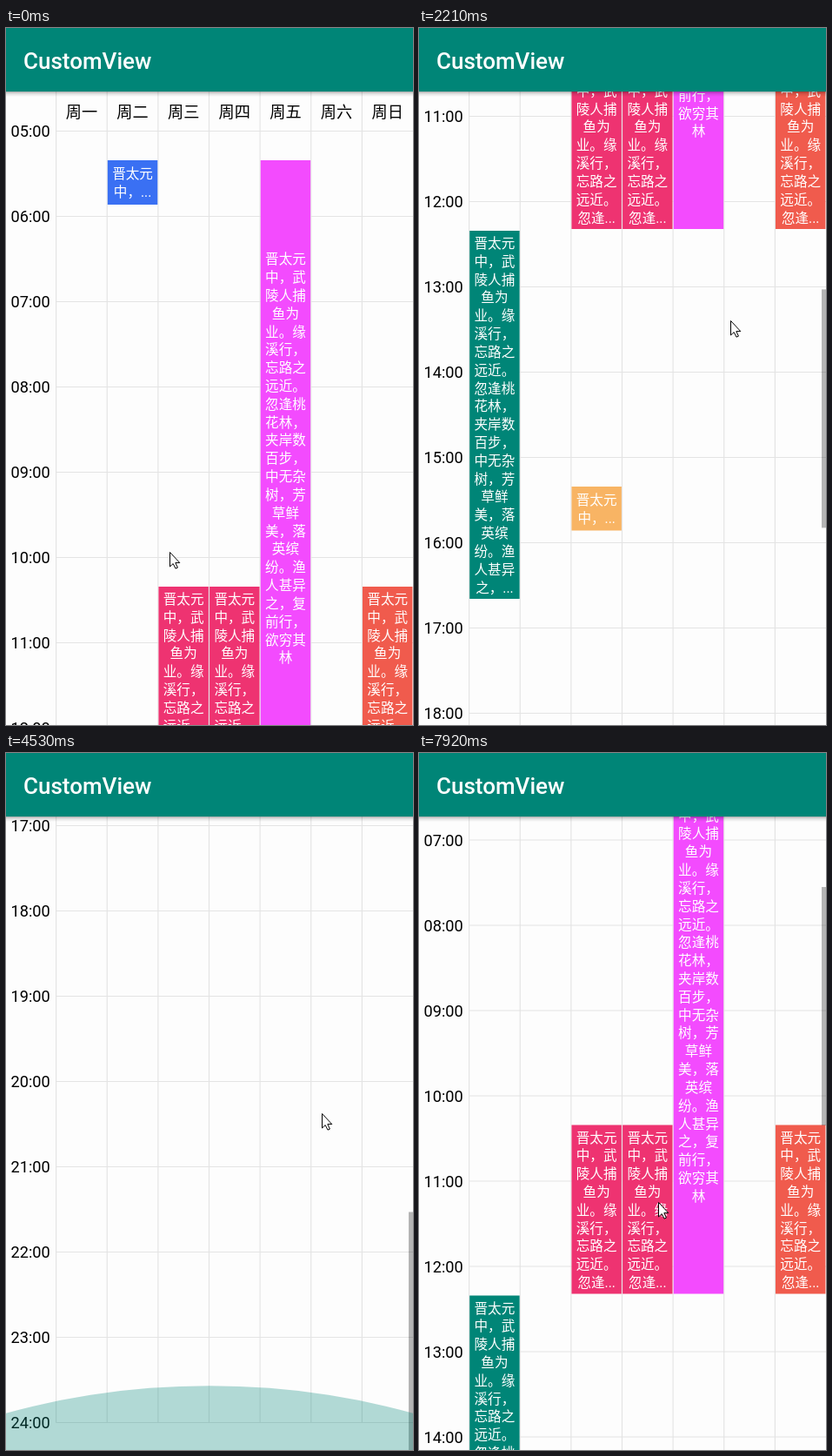
An HTML page with a canvas that plays this animation: 468 px wide and 801 px high, repeating every 8000 ms.

```html
<!DOCTYPE html>
<html lang="zh-CN">
<head>
<meta charset="utf-8">
<title>CustomView</title>
<style>
  html, body { margin: 0; width: 100%; height: 100%; overflow: hidden; background: #fdfdfd; }
  canvas { display: block; }
</style>
</head>
<body>
<canvas id="stage" width="468" height="801"></canvas>
<script>
const ctx = document.getElementById('stage').getContext('2d');
const W = 468, H = 801, LOOP = 8000;
const BAR = 73, LEFT = 57.6, COL = (W - LEFT) / 7;
const TOP = 118.5, HOUR = 98, MAX_SCROLL = 1211;
const TEAL = '#008577';
const CJK = 'Roboto, "Noto Sans CJK SC", "Noto Sans CJK", sans-serif';

const DAYS = [...'一二三四五六日'].map(d => '周' + d);
const STORY = ('晋太元 中，武 陵人捕 鱼为 业。缘 溪行， 忘路之 远近。 忽逢桃 花林， 夹岸数 百步， ' +
  '中无杂 树，芳 草鲜 美，落 英缤 纷。渔 人甚异 之，复 前行， 欲穷其 林').split(' ');

// day, top, bottom, visible lines, colour
const EVENTS = [
  [1, 152, 203, 2, '#3a70f3'],
  [4, 152, 836, 23, '#f34bfe'],
  [2, 642, 836, 9, '#ee3371'],
  [3, 642, 836, 9, '#ee3371'],
  [6, 642, 836, 9, '#f05b4d'],
  [0, 838, 1261, 20, TEAL],
  [2, 1132, 1182.5, 2, '#f8b464']
];

// time, pointer x, pointer y, scroll, edge glow
const KEYS = [
  [0, 188, 602, 0, 0],
  [400, 188, 602, 0, 0],
  [900, 205, 390, 170, 0],
  [1100, 225, 370, 212, 0],
  [1520, 266, 660, 228, 0],
  [1670, 270, 687, 229, 0],
  [2210, 358, 336, 605, 0],
  [2630, 350, 400, 750, 0],
  [3100, 325, 590, 818, 0],
  [3470, 313, 656, 828, 0],
  [3640, 313, 656, 828, 0],
  [4080, 340, 400, 1060, 0],
  [4380, 355, 385, 1211, 0.5],
  [4530, 363, 414, 1211, 0.785],
  [5100, 350, 425, 1211, 0],
  [6000, 267, 708, 936.5, 0],
  [6400, 270, 560, 740, 0],
  [6900, 272, 330, 590, 0],
  [7200, 273, 320, 560, 0],
  [7920, 275, 516, 214.5, 0],
  [8000, 275, 516, 214.5, 0]
];

// Screen refreshes: s = short, l = long, p = pause
const HOLD = { s: 120, l: 150, p: 250 };
const TICKS = [0, 500];
for (const c of 'ssslsssl' + 'l' + 'lssllsl' + 's' + 'llsllp' + 'l' +
                'slslsll' + 'l' + 'ssslsssl' + 'l' + 'slslsls' + 's' + 'llsll')
  TICKS.push(TICKS[TICKS.length - 1] + HOLD[c]);

const POINTER = new Path2D('M.5 .5V17L4.2 13.6L7 19.2L9.4 18.1L6.8 12.6H11.8Z');

function slope(i, k) {
  const a = KEYS[i - 1], b = KEYS[i], c = KEYS[i + 1];
  if (!a || !c) return 0;
  const d = (b[k] - a[k]) / (b[0] - a[0]), e = (c[k] - b[k]) / (c[0] - b[0]);
  return d * e > 0 ? 2 * d * e / (d + e) : 0;
}

// Monotone cubic interpolation of column k
function sample(t, k) {
  const i = Math.max(0, KEYS.findIndex(r => r[0] > t) - 1);
  const a = KEYS[i], b = KEYS[i + 1], h = b[0] - a[0], u = (t - a[0]) / h;
  const v = 1 - u;
  return v * v * ((1 + 2 * u) * a[k] + u * h * slope(i, k)) +
         u * u * ((3 - 2 * u) * b[k] - v * h * slope(i + 1, k));
}

function text(str, x, y, size, color, align = 'center', weight = 400) {
  ctx.font = `${weight} ${size}px ${CJK}`;
  ctx.textAlign = align;
  ctx.fillStyle = color;
  ctx.fillText(str, x, y);
}

function line(x1, y1, x2, y2) {
  ctx.beginPath();
  ctx.moveTo(x1, y1);
  ctx.lineTo(x2, y2);
  ctx.stroke();
}

function drawGrid() {
  const end = TOP + 19 * HOUR;
  ctx.strokeStyle = '#e4e4e4';
  ctx.lineWidth = 1.2;
  DAYS.forEach((day, i) => {
    const x = LEFT + i * COL;
    line(x, BAR, x, end);
    text(day, x + COL / 2, 102.5, 18.2, '#000');
  });
  for (let h = 5; h <= 24; h++) {
    const y = TOP + (h - 5) * HOUR;
    line(LEFT, y, W, y);
    text(String(h).padStart(2, '0') + ':00', 5.5, y + 6.5, 18.2, '#000', 'left');
  }
}

function drawEvent([day, top, bottom, count, color]) {
  const x = LEFT + day * COL + 0.6, w = COL - 1.2;
  ctx.fillStyle = color;
  ctx.fillRect(x, top, w, bottom - top);
  const first = (top + bottom) / 2 + 0.4 - (count - 1) * 10.41;
  for (let i = 0; i < count; i++) {
    const cut = i === count - 1 && count < STORY.length;
    const str = cut ? STORY[i].slice(0, 2) + '...' : STORY[i];
    text(str, x + w / 2, first + i * 20.82 + 5.9, 15.6, '#fff');
  }
}

function drawGlow(g) {
  if (g < 0.01) return;
  const r = W * 1.5, rise = r * (1 - Math.cos(Math.PI / 6)) * g;
  ctx.fillStyle = `rgba(0,133,119,${0.3 * Math.min(1, g / 0.785)})`;
  ctx.beginPath();
  ctx.ellipse(W / 2, H - rise + r * g, r, r * g, 0, 0, 2 * Math.PI);
  ctx.fill();
}

function drawBar() {
  const shade = ctx.createLinearGradient(0, BAR, 0, BAR + 6);
  shade.addColorStop(0, 'rgba(0,0,0,.32)');
  shade.addColorStop(0.4, 'rgba(0,0,0,.12)');
  shade.addColorStop(1, 'rgba(0,0,0,0)');
  ctx.fillStyle = shade;
  ctx.fillRect(0, BAR, W, 6);
  ctx.fillStyle = TEAL;
  ctx.fillRect(0, 0, W, BAR);
  text('CustomView', 20, 47, 26, '#fff', 'left', 500);
}

function drawPointer(x, y) {
  ctx.save();
  ctx.translate(x, y);
  ctx.fillStyle = '#fff';
  ctx.strokeStyle = '#000';
  ctx.lineWidth = 1;
  ctx.fill(POINTER);
  ctx.stroke(POINTER);
  ctx.restore();
}

function draw(time) {
  const t = TICKS.filter(k => k <= time).pop();
  const scroll = sample(t, 3);
  ctx.fillStyle = '#fdfdfd';
  ctx.fillRect(0, 0, W, H);

  ctx.save();
  ctx.translate(0, -scroll);
  drawGrid();
  EVENTS.forEach(drawEvent);
  ctx.restore();

  if (t > 0) {
    ctx.fillStyle = 'rgba(0,0,0,.29)';
    ctx.fillRect(463, 527.5 - (MAX_SCROLL - scroll) * 0.3748, 5, 274);
  }
  drawGlow(sample(t, 4));
  drawBar();
  drawPointer(Math.round(sample(t, 1)), Math.round(sample(t, 2)));
}

const start = performance.now();
function frame() {
  draw((performance.now() - start) % LOOP);
  requestAnimationFrame(frame);
}
frame();
</script>
</body>
</html>
```
